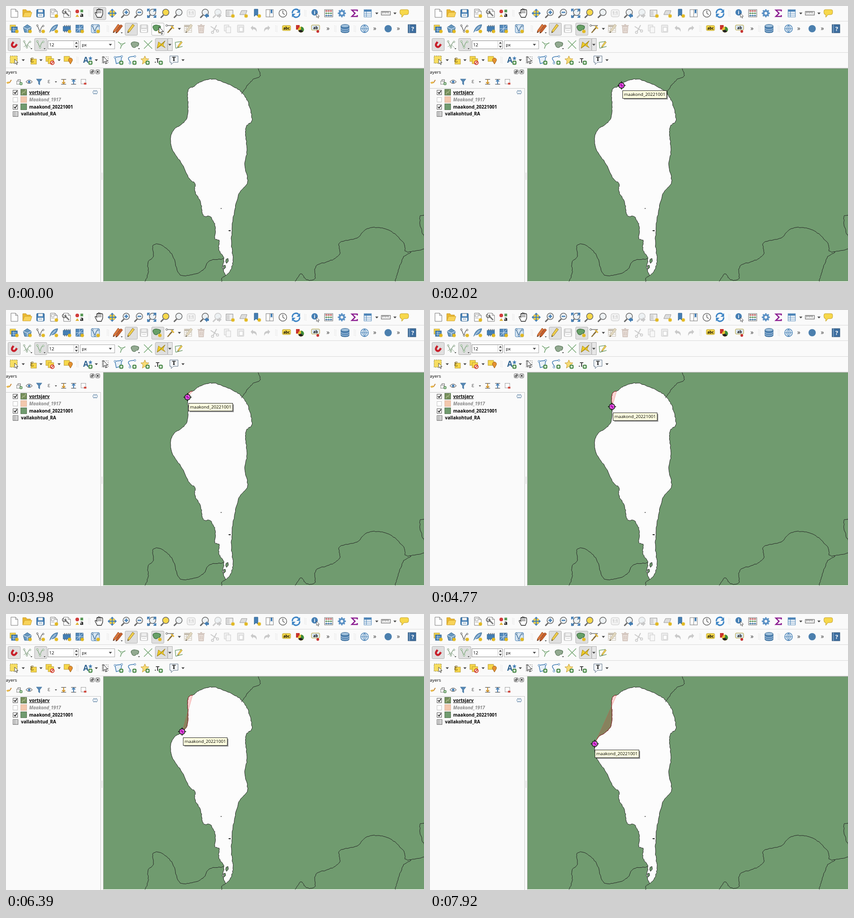
Animation of 921x608 px, one loop 8 s. Source, as an HTML page:

```html
<!DOCTYPE html>
<html lang="en">
<head>
<meta charset="utf-8">
<title>Tracing a lake shore</title>
<style>
html, body { margin: 0; width: 100%; height: 100%; overflow: hidden; background: #fafafa; }
svg { display: block; width: 921px; height: 608px; font-family: "Open Sans", "Noto Sans", sans-serif; font-size: 9.8px; }
</style>
</head>
<body>
<svg id="stage" viewBox="0 0 921 608"></svg>
<script>
const BLUE = '#447eb4', NAVY = '#2f628f', YELLOW = '#f7d84b', GOLD = '#b8992c', GREEN = '#5c9a5a', GREY = '#666', PALE = '#c9c9c9', INK = '#232323', LAND = '#709b6f';

// Drawing helpers
const p = (d, fill = 'none', stroke = 'none', w = 1) => `<path d="${d}" fill="${fill}" stroke="${stroke}" stroke-width="${w}"/>`;
const box = (x, y, w, h, fill, stroke = 'none', r = 0) => `<rect x="${x}" y="${y}" width="${w}" height="${h}" rx="${r}" fill="${fill}" stroke="${stroke}"/>`;
const dot = (x, y, r, fill, stroke = 'none', w = 1) => `<circle cx="${x}" cy="${y}" r="${r}" fill="${fill}" stroke="${stroke}" stroke-width="${w}"/>`;
const text = (x, y, s, attrs = '') => `<text x="${x}" y="${y}" ${attrs}>${s}</text>`;
const at = (x, y, body, id = '') => `<g ${id && `id="${id}"`} transform="translate(${x} ${y})">${body}</g>`;
const scale = (k, body) => `<g transform="scale(${k})">${body}</g>`;
const button = (x, y, fill = '#dfdfdf', stroke = '#b2b2b2') => box(x - 13.5, y - 13.5, 27, 27, fill, stroke, 2);
const bold = (size, more = '') => `font-weight="bold" font-size="${size}" ${more}`;
const mid = 'text-anchor="middle"';

// Parts shared by several icons
const plus = at(6, 6, box(-4, -4, 8, 8, GREEN, '#3d7a3d', 2) + p('M-2.5 0h5M0-2.5v5', 'none', '#fff', 1.5));
const spark = at(6, 6, p('M0-4V4M-4 0H4M-3-3l6 6M3-3l-6 6', 'none', '#e2b820', 1.8));
const page = p('M-7-9H3l5 5V9H-7zM3-9v5h5', '#fff', '#777');
const disk = (c, line) => box(-8.5, -8.5, 17, 17, c, line, 2) + box(-5, -8, 10, 6, '#eee') + box(-6, 1, 12, 7, '#fff') + p('M-4 4H4', 'none', line);
const lens = (inside = '', c = GREY, fill = '#edf1f3') => p('M-3 4l-6 6', 'none', c, 3) + dot(2, -2, 7, fill, c, 1.5) + at(2, -2, inside);
const grid = c => box(-8, -8, 16, 16, '#fff', c) + p('M-8-5.5H8', 'none', c, 4) + p('M-8 0H8M-8 4H8M-3-8V8', 'none', c);
const vee = c => p('M-7-7L-1 7Q2-7 7-6', 'none', c, 1.3) + [[-7, -7], [-1, 6], [6, -6]].map(([x, y]) => dot(x, y, 1.8, '#fff', c)).join('');
const pencil = (c, line) => p('M-7 9l1-5L4-10l4 3L-3 7z', c, line) + p('M-7 9l.5-3 2 1.500z', INK);
const arrows = c => p('M-9-4v-5h5M4-9h5v5M9 4v5H4M-4 9h-5V4M-8-8l4 4M8-8L4-4M8 8L4 4M-8 8l4-4', 'none', c, 2.2);
const blob = (fill, line) => at(-1, -2, p('M-7 2C-11-4-5-7 1-6S10-4 8 1 4 2 2 5-6 7-7 2z', fill, line, 1.2));
const star = (c, line) => p('M0-9l2.6 6 6.4.5-5 4.3L5.6 9 0 5.3-5.6 9-4 1.8l-5-4.3 6.4-.5z', c, line);
const pointer = p('M0 0v14l3.3-3 2.3 5.4 2.3-1-2.3-5.1h4.6z', '#fff', '#111');
const undo = p('M-7-2l5-5v3Q8-3 6 7 4 0-2 1v3z', PALE);
const epsilon = c => text(-5, 5, 'ε', `font-size="18" fill="${c}"`);
const tag = (s, c) => box(-9, -6, 18, 11, c, '#b39c25', 2) + text(0, 2.5, s, mid + bold(8));
const down = p('M-3.5-1.5h7L0 2.5z', '#444');
const tiny = at(9, 9, scale(.6, down));
const card = (x, y) => box(x, y, 12, 11, YELLOW, GOLD);

const icons = {
  down, page, undo, sep: '',
  more: text(-4, 4, '»', 'font-size="14" fill="#333"'),
  handle: '<path d="M-2-7V8M1-6V9" stroke="#c4c4c4" stroke-dasharray="1 2"/>',
  globe: dot(0, 0, 8.5, '#dce9f3', BLUE, 1.3) + p('M-8 0H8M0-8V8M0-8Q-8 0 0 8Q8 0 0-8', 'none', BLUE),
  folder: p('M-10 8V-8h7l2 3H7v3', '#eab932', '#c99722') + p('M-10 8l4-10H10L7 8z', '#f8d359', '#d2a32b'),
  save: disk(BLUE, NAVY),
  layout: page + p('M-5-6h6v5h-6zM-5 2h7', 'none', '#999') + spark,
  wrench: page + p('M-5-4l10 10', 'none', '#777', 3) + p('M-7-7a4 4 0 1 0 4 1', 'none', '#555', 1.5),
  style: dot(-5, -4, 4, '#d13c3c') + box(2, -8, 6, 6, GREEN) + p('M-9 8l4-6 4 6z', '#e0b53a') + text(1, 8, 'a', bold(13)),
  hand: p('M-4 9L-8 1c-2-3 1-4 3-1V-6c0-3 3-3 3 0 0-5 3-5 3 0 0-4 3-4 3 0 0-3 4-3 4 1v7l-3 7z', '#fff', '#222', 1.3) + p('M-2-5v5M1-5v5M4-5v5', 'none', '#222'),
  pan: box(-5, -5, 10, 10, YELLOW, '#c59a1d') + p('M0-10l4 4h-8zM0 10l4-4h-8zM-10 0l4-4v8zM10 0l-4-4v8z', BLUE) + p('M0-7V7M-7 0H7', 'none', BLUE, 2),
  zoomIn: lens(p('M-4 0h8M0-4v8', 'none', BLUE, 2.5)),
  zoomOut: lens(p('M-4 0h8', 'none', BLUE, 2.5)),
  zoomFull: lens() + arrows(BLUE),
  zoomSel: lens('', GREY, YELLOW),
  zoomLayer: lens(),
  zoomOne: box(-9, -8, 18, 16, '#f1f1f1', PALE, 4) + text(0, 3, '1:1', mid + ' font-size="9" fill="#aaa"'),
  zoomLast: lens() + p('M0 5l6-5v3h4v5H6v3z', BLUE),
  zoomNext: lens('', PALE) + p('M10 5L4 0v3H0v5h4v3z', PALE),
  mapView: box(-9, -7, 15, 14, '#eee', '#888') + p('M-6-5v10M-3-5v10', 'none', '#aaa') + spark,
  scene: p('M-8 3l4-9H8L5 3z', '#ddd', '#999') + spark,
  mark: p('M-5-9H3V7L-1 3l-4 4z', BLUE, NAVY) + spark,
  book: box(-8, -8, 16, 16, '#fff', '#777') + p('M0-8V8', 'none', '#777') + p('M2-8h4V1L4-1 2 1z', BLUE),
  clock: dot(0, 0, 8.5, '#fff', GREY, 1.5) + p('M0-6v6l4 3', 'none', '#444', 1.3),
  refresh: p('M-8 0A8 8 0 0 1 6-6M8 0A8 8 0 0 1-6 6', 'none', '#3f86c6', 3) + p('M9-9v8H1zM-9 9V1h8z', '#3f86c6'),
  identify: dot(-2, -2, 7, BLUE) + text(-2, 2, 'i', mid + bold(11, 'fill="#fff"')) + at(2, 0, scale(.65, pointer)),
  abacus: box(-9, -8, 18, 16, '#fff', GREY) + ['#c55', GREEN, BLUE].map((c, i) => p(`M-8 ${i * 5 - 5}H8`, 'none', '#555') + [-5, 0, 5].map(x => dot(x, i * 5 - 5, 1.8, c)).join('')).join(''),
  gear: dot(0, 0, 5, 'none', '#5b91c5', 4) + [0, 45, 90, 135].map(a => `<g transform="rotate(${a})">${p('M0-9v4M0 5v4', 'none', '#5b91c5', 3)}</g>`).join(''),
  sum: p('M6-4v-3H-6L1 0l-7 7H6V4', 'none', '#8c1d91', 2.6),
  table: grid(BLUE),
  ruler: box(-10, -4, 20, 8, '#ededed', '#555') + p('M-7-4v4M-4-4v3M-1-4v4M2-4v3M5-4v4', 'none', '#555'),
  bubble: p('M-6-8H7q3 0 3 3v4q0 4-4 4H0l-5 6V3q-4 0-4-4v-4q0-3 3-3z', YELLOW, '#c2a02b'),

  sources: card(-9, -8) + box(-6, -4, 13, 12, BLUE, NAVY) + p('M-4 0h9M-4 4h9M-1-3V7', 'none', '#bcd4e8') + spark,
  pack: p('M-9-3L0-9 9-3 6 8H-6z', '#6797be', NAVY) + p('M-9-3L0 1l9-4M0 1v7', 'none', '#fff') + spark,
  vector: vee('#555') + spark,
  feather: p('M-9 9Q-5-8 9-9 7 4-5 5z', '#6f9dc5', NAVY) + p('M-9 9L4-5', 'none', '#fff') + spark,
  chip: box(-8, -5, 16, 10, BLUE, NAVY) + p('M-5-8v3M-1-8v3M3-8v3M7-8v3M-5 5v3M-1 5v3M3 5v3', 'none', '#456', 1.5) + spark,
  mesh: box(-8, -8, 16, 16, '#5288bb', NAVY) + p('M-8 8L8-8M-8 0H8M0-8V8', 'none', '#d7e5f0') + spark,
  virtual: box(-9, -9, 18, 18, '#d5e4f1', BLUE, 2) + vee(NAVY) + spark,
  pencils: at(-3, 0, pencil('#d9773c', '#9c4a20')) + at(3, 1, pencil('#c75f2c', '#9c4a20')) + tiny,
  pencil: pencil('#f0cf4c', '#947622'),
  saveOff: disk('#d7d7d7', '#bcbcbc'),
  polygon: blob('#68a067', '#35693a') + spark,
  vertex: p('M-9-7H7L-2 3', 'none', '#777', 1.3) + dot(-8, -7, 2, '#fff', '#555') + p('M-6 9L4-2', 'none', '#8b6f35', 2.5) + p('M2-6l6 6', 'none', '#e1b63a', 3),
  editOff: grid('#c4bcae') + at(2, 0, pencil('#e2d8c0', '#c2b89f')),
  trash: p('M-6-5H6L5 9H-5zM-8-7H8M-2-9h4M-2-2v8M2-2v8', '#e9dfd9', '#c9b9b0', 1.3),
  cut: p('M-8-5L6 4M-3 7L5-8', 'none', PALE, 2) + dot(7, 5, 2.5, 'none', PALE, 1.5) + dot(-4, 8, 2.5, 'none', PALE, 1.5),
  copy: box(-7, -8, 10, 13, '#f2f2f2', PALE) + box(-3, -4, 10, 13, '#f7f7f7', PALE),
  paste: box(-7, -8, 14, 16, '#ececec', PALE, 1) + box(-3, -3, 8, 9, '#fff', PALE),
  redo: scale('-1 1', undo),
  label: at(0, -1, tag('abc', YELLOW)),
  pie: box(-8, -8, 8, 10, '#c7332d') + dot(3, 2, 6.5, '#e6c033') + p('M3 2v-6.5A6.5 6.5 0 0 1 8 6z', '#3a8c3c') + p('M3 2L8 6A6.5 6.5 0 0 1-3 4z', INK),
  pin: at(0, -2, tag('ab', '#dce8f4')) + dot(5, 6, 3, '#c73232'),
  base: p('M-9-6v12c0 4 18 4 18 0V-6z', '#5083b3', NAVY) + `<ellipse cy="-6" rx="9" ry="3.5" fill="#9fc0dc" stroke="${NAVY}"/>` + p('M-9-1c0 4 18 4 18 0M-9 3c0 4 18 4 18 0', 'none', '#cfe0ee'),
  script: dot(0, 0, 8, '#4b7fae'),
  help: box(-8, -9, 17, 18, '#3d6ea0', '#274c73') + p('M-5-9V9', 'none', '#a8c2db') + text(2, 5, '?', mid + bold(13, 'fill="#fff"')),

  magnet: `<g transform="rotate(35) scale(.9)">${p('M-5-7V1a5 5 0 0 0 10 0V-7', 'none', '#c8202b', 5) + p('M-7.5-6h5M2.500-6h5', 'none', '#ddd', 3)}</g>`,
  snapAll: vee('#7b987a') + p('M-8 5l8-5 7 7', 'none', '#8aa889') + tiny,
  snapV: vee('#79a577') + tiny,
  topo: p('M-8-6l8 6 8-4M0 0l-3 9', 'none', '#6c9d6b', 1.5) + dot(0, 0, 2, '#fff', GREEN),
  overlap: at(1, 2, blob('#93aa91', '#577457')) + tiny,
  cross: p('M-9-9L9 9M9-9L-9 9', 'none', '#77a875', 1.5),
  trace: p('M-9 8L-6-6 0-1 8-8 4 1 9 7 0 2z', '#f0cd28', '#a88a1c') + p('M-9 8L9-8', 'none', '#8c7319'),
  selfSnap: p('M-7 8l-1-13L6-7M-7 8L8 4', 'none', '#76a274', 1.4) + at(2, 0, scale(.7, pencil('#efd056', '#997d25'))),

  select: '<rect x="-9" y="-9" width="16" height="16" fill="#f7de62" stroke="#665c24" stroke-dasharray="2 2"/>' + at(1, -2, scale(.75, pointer)),
  byValue: card(-3, -2) + epsilon('#6b5312'),
  deselect: card(-9, -8) + card(-4, -3) + dot(5, 6, 4, '#fff', '#d24434', 2) + p('M2 9l6-6', 'none', '#d24434', 2),
  locate: card(-9, -8) + p('M5 9L1 2a4.500 4.500 0 1 1 8 0z', '#e59131', '#9c651d'),
  annot: text(-10, 6, 'A', bold(17, `fill="${NAVY}"`)) + at(6, -4, scale(.45, star(BLUE, BLUE))) + plus,
  modify: '<rect x="-7" y="-7" width="13" height="14" fill="none" stroke="#555" stroke-dasharray="2 2"/>' + at(-5, -8, pointer),
  notePoly: p('M-8-6L7-8 5 5-5 8z', '#e8f0f7', BLUE, 1.5) + dot(-8, -6, 2, '#fff', BLUE) + dot(7, -8, 2, '#fff', BLUE) + plus,
  noteLine: p('M7-8Q-12-8-6 0T-4 8', 'none', BLUE, 1.5) + dot(7, -8, 2, '#fff', BLUE) + dot(-4, 7, 2, '#fff', BLUE) + plus,
  noteStar: star('#f8dc76', '#c69b31') + plus,
  noteText: text(-8, 6, '.T', bold(14, 'fill="#444"')) + plus,
  callout: p('M-9-9H9V5H-1l-5 5V5h-3z', '#f4f7fa', '#5d7186') + text(0, 2, 'T', mid + bold(12, 'font-family="Noto Serif, serif"'))
};

// Toolbars flow from left to right; most items share one width
const widths = { down: 10.7, handle: 14, sep: 6, more: 17 };
function toolbar(x, row, names) {
  return names.split(' ').map(name => {
    const w = widths[name] || 28.9;
    x += w;
    return at(Math.round(x - w / 2), Math.round(16 + row * 34.4), icons[name]);
  }).join('');
}
const toolbars =
  toolbar(3.5, 0, 'page folder save layout wrench style handle hand pan zoomIn zoomOut zoomFull zoomSel zoomLayer zoomOne zoomLast zoomNext mapView scene mark book clock refresh handle identify abacus gear sum table down ruler down bubble') +
  toolbar(3.5, 1, 'sources pack vector feather chip mesh sep virtual sep handle pencils pencil saveOff polygon vertex down editOff trash cut copy paste undo redo handle label pie sep pin sep more handle base handle globe more sep script more sep help') +
  toolbar(4, 2, 'magnet snapAll snapV') + toolbar(240.5, 2, 'topo overlap cross trace down selfSnap') +
  toolbar(3.5, 3, 'select down byValue down deselect down locate handle annot down modify notePoly noteLine noteStar noteText sep callout down');

const fields = box(92.5, 76.5, 67, 18, '#fff', '#8a8a8a') + text(95, 89, '12') + p('M149.500 77v18M150 85.500h10', 'none', '#ccc') +
  p('M152 83l3-4 3 4zM152 88l3 4 3-4z', '#444') + box(163.5, 76.5, 76, 18, '#fff', '#aaa') + text(167, 89, 'px') + at(230, 85, down);

// Layer panel
const panelTools = [
  p('M-8 3h9l6-9', 'none', '#c88c3d', 3) + p('M-9 2l4 5 7-4-4-4z', '#e7b746'),
  box(-8, -2, 11, 10, '#eee', GREY) + p('M-4-2v-5h8V6', 'none', GREY, 1.6) + plus,
  p('M-10 0Q0-12 10 0 0 11-10 0z', '#fff', '#555', 1.6) + dot(0, 0, 4, BLUE),
  p('M-9-9H9L2 0v10l-4-3V0z', '#5688b5', NAVY),
  epsilon('#555') + at(22, 0, down),
  p('M-8-8H8M-8 8H8', 'none', '#555', 2) + p('M0-7v12M-5 1l5 5 5-5', 'none', '#d1962e', 3),
  p('M-8-8H8M-8 8H8', 'none', '#555', 2) + p('M0 7V-5M-5-1l5-5 5 5', 'none', BLUE, 3),
  box(-8, -8, 15, 15, '#fff', '#777') + box(1, 3, 8, 6, '#d14b41')
].map((body, i) => at(7 + 22 * i + (i > 4 ? 10 : 0), 167, scale(.68, body))).join('');
const layer = (y, name, color, shown, attrs) =>
  box(15.5, y - 4.5, 10, 10, '#fff', shown ? '#555' : '#c4c4c4') + (shown ? p(`M17.500 ${y}l2.500 3 4-6`, 'none', '#111', 1.6) : '') +
  box(32.5, y - 6.5, 13, 13, color, shown ? '#55734f' : '#dfb79f') + text(51, y + 4, name, bold(10, attrs));
const closer = x => box(x, 140.5, 9, 9, '#fff', '#555', 2);
const panel = box(-1, 181.5, 209.5, 427, '#fafafa', '#c8c8c8') + text(-5.5, 149, 'Layers') + panelTools +
  closer(185.5) + box(187.5, 144.5, 3, 3, 'none', '#333') + box(189.5, 142.5, 3, 3, 'none', '#333') +
  closer(197.5) + p('M199.500 142.500l5 5m0-5l-5 5', 'none', '#222', 1.4) +
  layer(190, 'vortsjarv', '#768f5c', true, 'text-decoration="underline"') + p('M35 195l3-6 2 2 4-7', 'none', '#c8d1a7') +
  layer(206, 'Maakond_1917', '#f3c8ae', false, 'font-style="italic" fill="#8a8a8a"') +
  layer(222, 'maakond_20221001', LAND, true, '') +
  box(15.5, 232.5, 11, 11, '#fff', GREY) + p('M16 235.500h10M16 238.500h10M16 241.500h10M19.500 233v10', 'none', '#888') +
  text(33, 241, 'vallakohtud_RA', bold(10)) +
  box(191.5, 187.5, 10, 5, '#eef3f8', '#6b8cab', 1) + '<path d="M193 186h8M193 194h8" stroke="#6b8cab" stroke-width="2" stroke-dasharray="1 2"/>' +
  p('M211.500 367v16', 'none', '#ccc');

// Smooth curve through a few points, roughened with seeded noise
const noise = i => { const v = Math.sin(i * 12.9898) * 43758.5453; return (v - Math.floor(v)) * 2 - 1; };
function curve(list, rough = 1) {
  const pts = list.split(' ').map(q => q.split(',').map(Number)), out = [pts[0]], n = 8;
  for (let i = 1; i < pts.length; i++) {
    const a = pts[i - 2] || pts[i - 1], b = pts[i - 1], c = pts[i], d = pts[i + 1] || c;
    for (let k = 1; k <= n; k++) {
      const u = k / n, wobble = k < n ? rough : 0;
      out.push([0, 1].map(j => b[j] + u * (c[j] - a[j]) / 2 + u * u * (a[j] - 2.5 * b[j] + 2 * c[j] - d[j] / 2) +
        u ** 3 * (1.5 * (b[j] - c[j]) + (d[j] - a[j]) / 2) + wobble * noise(b[0] + b[1] + k * 7 + j * 3)));
    }
  }
  return out;
}
const line = list => 'M' + list.map(q => q.map(v => v.toFixed(1)).join(' ')).join('L');

const westShore = curve('411,179 403,182 400,197 401,220 399,246 386,261 371,271 363,286', .6);
const lake = [westShore,
  curve('363,286 366,315 388,349 404,380 417,392 416,407 429,434 435,462 450,464 461,486 460,511 470,518 469,537 480,556 477,575 484,594'),
  curve('484,594 494,583 500,560 497,525 498,490 504,449 515,411 532,388 526,350 531,318 528,281 530,264 541,254 539,228 530,205'),
  curve('530,205 519,190 498,176 457,161 430,167 411,179')].flat();
const borders = [
  '555,138 560,154 543,163 533,174 519,194',
  '306,607 313,588 313,565 325,550 324,527 345,528 367,550 382,590 410,592 434,582 449,561 480,557',
  '484,594 475,600 476,607',
  '637,607 650,590 662,603 680,601 683,573 712,562 735,547 736,521 774,511 793,492 822,488 850,497 877,523 880,540 892,542 875,555 862,590 858,607',
  '890,542 921,535',
  '921,461 912,464 914,488 921,507'
];
const map = box(214, 138, 707, 468.5, LAND) + p('M214.500 607V137.500H921', 'none', '#a5aca4') +
  p(line(lake) + 'Z', '#fcfcfc', INK) + borders.map(b => p(line(curve(b)), 'none', INK)).join('') +
  p('M485 558l4-2 1 6-4 5-2-4zM479 572l4-1 1 5-4 4z', LAND, INK) + p('M490 494h5v2h-4z', INK) + dot(474, 446, 1, INK);

const tipBox = (w, h) => box(3, 3, w, h, 'rgba(0,0,0,.4)') + box(.5, .5, w, h, '#ffffe1', '#222');
const target = dot(0, 0, 6.2, '#f6f0f6', '#111', 1.5) +
  `<g id="snap">${dot(0, 0, 4.8, '#d61fd6') + p('M-2-2l4 4M2-2l-4 4', 'none', '#8a108a', 1.5) + dot(-1.5, 1.5, 1, '#f7c6f7') + dot(2, -2, 1, '#f7c6f7')}</g>` +
  p('M-9 0h4M5 0h4M0-9v4M0 5v4', 'none', '#111', 1.6);

const $ = id => document.getElementById(id);
$('stage').innerHTML = box(0, 0, 921, 608, '#fafafa') +
  p('M0 33.500H921M0 67.500H921M0 102.500H921M0 136.500H921', 'none', '#dadada') +
  `<g id="handButton">${button(206.5, 16.5)}</g>` + button(276, 51) + `<g id="polyHover">${button(334.5, 51, '#fff')}</g><g id="polyDown">${button(334.5, 51)}</g>` +
  button(18, 85) + button(76.5, 85) + button(342.5, 85) + box(356.5, 71.5, 10, 27, '#e6e6e6', '#b2b2b2') +
  toolbars + fields + panel + map +
  '<path id="area" fill="rgba(255,0,0,.16)"/><path id="traced" fill="none" stroke="#a4262a"/><path id="chord" fill="none" stroke="#e04a43" stroke-dasharray="1 1.500"/>' +
  at(338, 60, tipBox(80, 32) + text(4, 13.5, 'Add Polygon', bold(9.8)) + text(4, 27, 'Feature (Ctrl+.)', bold(9.8)), 'hint') +
  at(0, 0, tipBox(97, 17) + text(3.5, 12, 'maakond_20221001', 'font-size="9.7"'), 'tip') +
  at(0, 0, target, 'target') + at(0, 0, pointer, 'pointer');

// The pointer goes from the toolbar to the shore, rests, then follows the shore in regular ticks
const TICK = 136.5, LEAVE = 1070, TRACE = 2740, SAMPLES = 240;
const approach = curve('337,46 316,125 308,226 402,222 422,175 414,180', 0);
const ticks = t => Math.floor(t / TICK + .4);
const ease = u => u - .23 * Math.sin(Math.PI * u) * (.73 - u);

// Evenly spaced points along the traced shore
const rail = document.createElementNS('http://www.w3.org/2000/svg', 'path');
rail.setAttribute('d', line(westShore));
const shore = Array.from({ length: SAMPLES + 1 }, (_, i) => {
  const q = rail.getPointAtLength(rail.getTotalLength() * i / SAMPLES);
  return [q.x, q.y];
});

const show = (id, on) => $(id).setAttribute('opacity', +on);
const move = (id, x, y) => $(id).setAttribute('transform', `translate(${Math.round(x)} ${Math.round(y)})`);

function draw(t) {
  const step = t < LEAVE ? -1 : Math.min(9, ticks(t - LEAVE));
  const u = t < TRACE ? 0 : Math.min(1, ticks(t - TRACE) / 38);
  const path = t < TRACE ? [] : shore.slice(0, Math.round(ease(u) * SAMPLES) + 1);
  const [x, y] = path.at(-1) || approach[4 * (step + 1)];
  const onMap = y > 138, snapped = step > 5;

  show('handButton', t < 800);
  show('polyHover', t < 800);
  show('polyDown', t >= 800);
  show('hint', t < 260 || t >= 800 ? 0 : t < 390 ? .5 : 1);
  show('pointer', !onMap);
  show('target', onMap);
  show('snap', snapped);
  show('tip', snapped);
  move('pointer', x, y);
  move('target', x, y);
  move('tip', x + 2 - 2 * u ** 4, y + (path.length ? 12.5 : 11));

  const d = u > .1 ? line(path) : '';
  $('area').setAttribute('d', d);
  $('traced').setAttribute('d', d);
  $('chord').setAttribute('d', d && line([path[0], [x, y]]));
}

function frame() {
  draw(performance.now() % 8000);
  requestAnimationFrame(frame);
}
frame();
</script>
</body>
</html>
```
